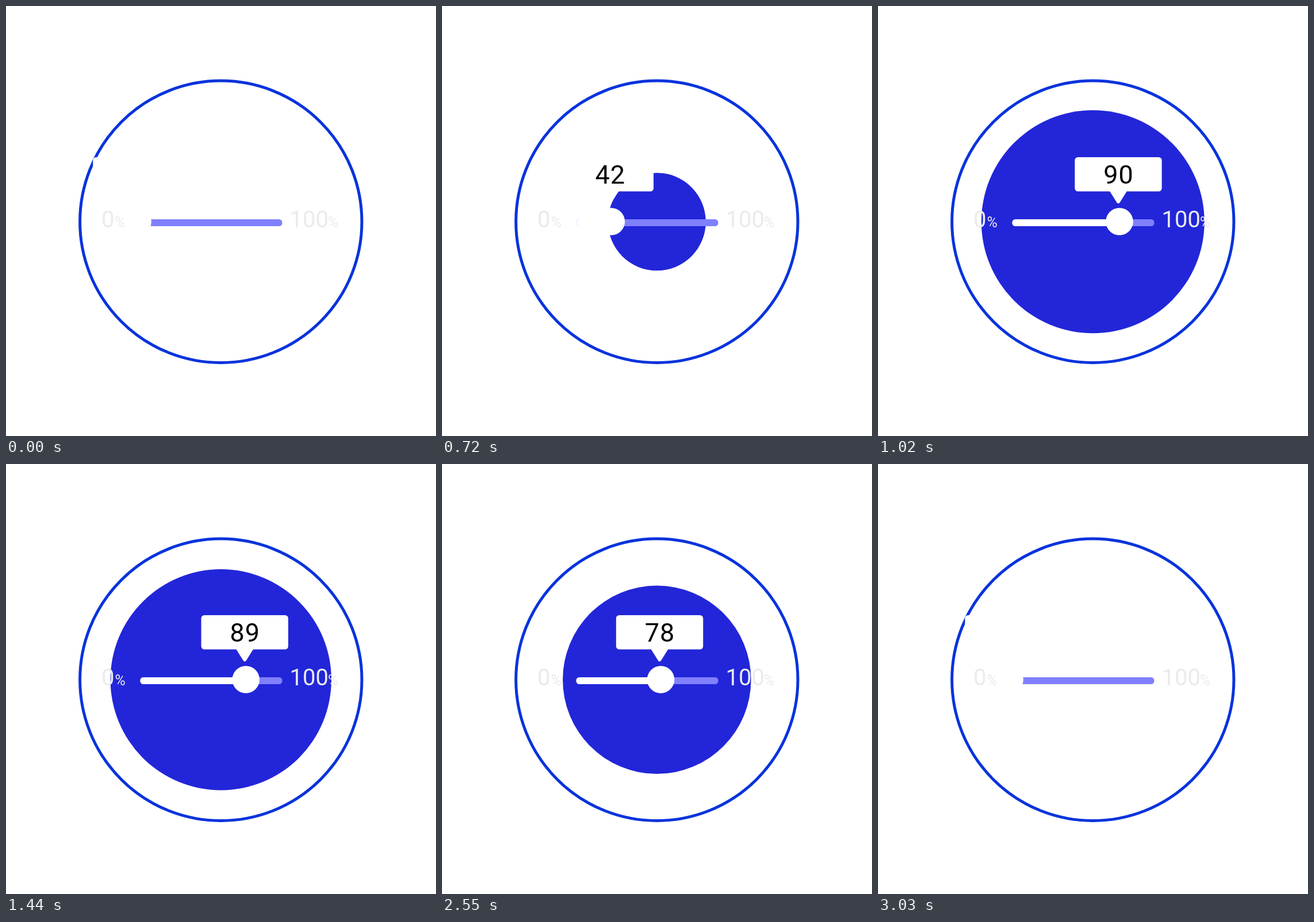
Animation of 748 by 748 pixels, one loop 3.39 s. Source, as an HTML page:

```html
<!DOCTYPE html>
<html lang="en">
<head>
<meta charset="utf-8">
<title>Percentage slider</title>
<style>
  html, body { margin: 0; width: 100%; height: 100%; overflow: hidden; background: #fff; }
  svg { display: block; width: 100vw; height: 100vh; }
  text { font-family: Roboto, "Open Sans", sans-serif; }
  .label { font-size: 40px; fill: #ebebeb; }
  .unit { font-size: 25px; }
  #value { font-size: 45px; letter-spacing: 1px; text-anchor: middle; fill: #000; }
</style>
</head>
<body>
<svg viewBox="0 0 748 748">
  <circle cx="373.8" cy="375.3" r="245.2" fill="#fff" stroke="#0833dc" stroke-width="5"/>
  <circle id="disc" cx="373.8" cy="375.3" fill="#2226d8"/>
  <text class="label" y="385"><tspan x="166">0</tspan><tspan class="unit" x="189.5">%</tspan></text>
  <text class="label" y="385"><tspan x="493.5">100</tspan><tspan class="unit" x="560">%</tspan></text>
  <rect x="233.5" y="371" width="247" height="12" rx="5.5" fill="#8080ff"/>
  <rect id="filled" x="233.5" y="371" height="12" rx="5.5" fill="#fff"/>
  <g id="slider">
    <circle cy="375" r="23.8" fill="#fff"/>
    <g transform="translate(-2 0)">
      <rect x="-75.7" y="263" width="151.4" height="59.5" rx="5.5" fill="#fff"/>
      <path d="M-15 322H15L2.5 342Q0 345 -2.5 342Z" fill="#fff"/>
      <text id="value" x=".5" y="308.5"></text>
    </g>
  </g>
</svg>
<script>
  const LOOP = 3390, STEP = 30;
  const [disc, filled, slider, value] =
    ["disc", "filled", "slider", "value"].map(id => document.getElementById(id));

  const clamp = v => Math.min(1, Math.max(0, v));
  const linear = u => u;
  const easeIn = power => u => u ** power;
  const easeOut = u => 1 - (1 - u) ** 1.2;

  const rest = { x: 229, r: 0, n: 0 };
  const near = { x: 364, r: 146, n: 87.4 };
  const peak = { x: 420, r: 194, n: 90 };
  const settled = { x: 390, r: 174, n: 83 };

  // The knob starts more slowly than the disc.
  const moves = [
    { start: 330, end: 870, from: rest, to: near, ease: easeIn(2.23), discEase: easeIn(1.66) },
    { start: 870, end: 1020, from: near, to: peak, ease: easeOut },
    { start: 1410, end: 1740, from: peak, to: settled, ease: linear },
    { start: 2520, end: 3030, from: settled, to: rest, ease: linear }
  ];

  function poseAt(t) {
    const move = moves.findLast(m => t >= m.start);
    if (!move) return rest;
    const { start, end, from, to, ease, discEase = ease } = move;
    const u = clamp((t - start) / (end - start));
    const mix = (key, f) => from[key] + (to[key] - from[key]) * f(u);
    return { x: mix("x", ease), r: mix("r", discEase), n: mix("n", ease) };
  }

  function draw(time) {
    const t = Math.floor((time % LOOP) / STEP) * STEP;
    const { x, r, n } = poseAt(t);
    disc.setAttribute("r", r);
    filled.setAttribute("width", Math.max(0, x - 233.5));
    slider.setAttribute("transform", `translate(${x} 0)`);
    value.textContent = Math.round(n);
    value.setAttribute("opacity", clamp((n - 15) / 16));
  }

  let origin;
  function tick(now) {
    origin ??= now;
    draw(now - origin);
    requestAnimationFrame(tick);
  }
  draw(0);
  requestAnimationFrame(tick);
</script>
</body>
</html>
```
